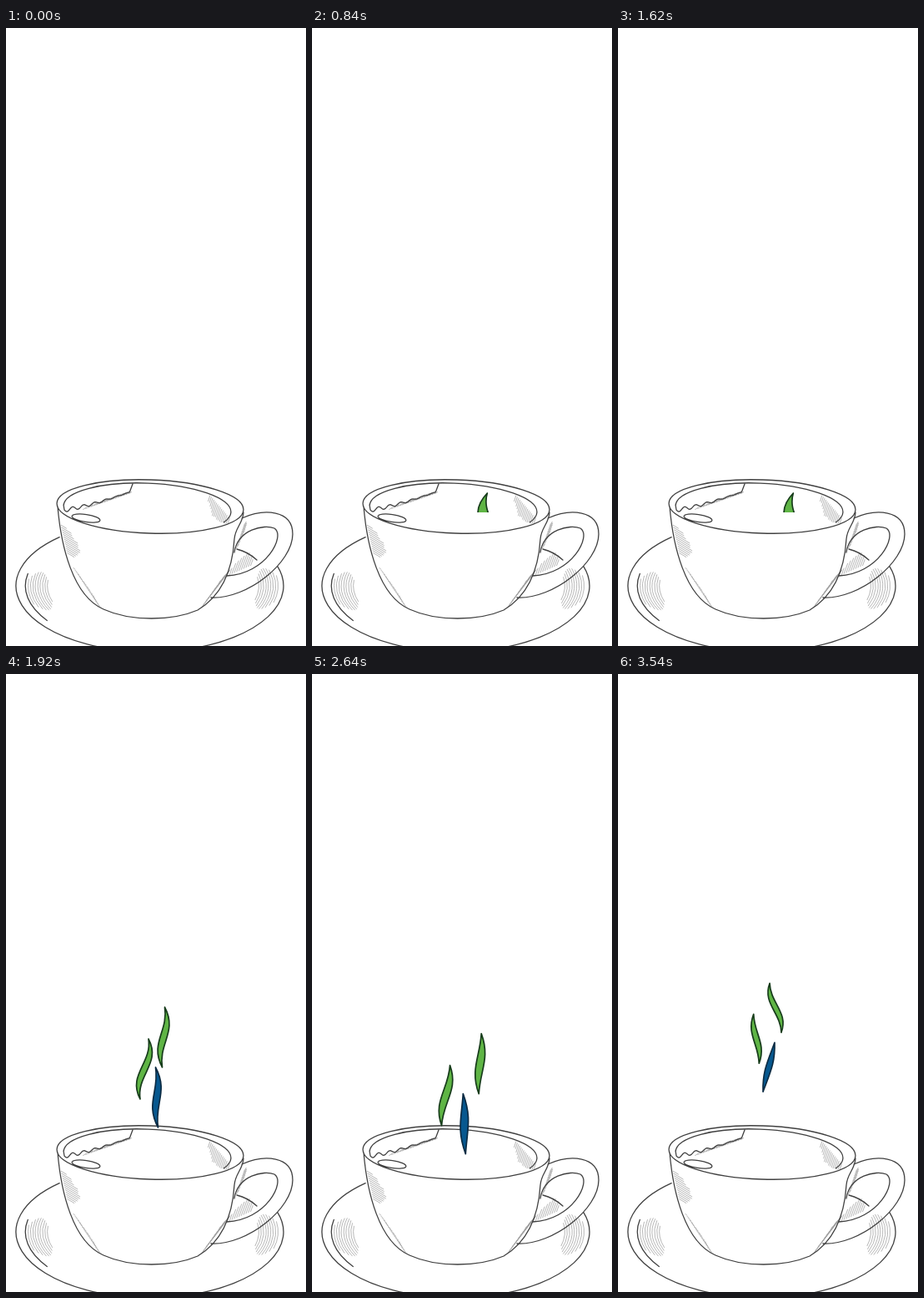
An HTML page with a canvas for the animation above (3.6 s loop, 360 px wide and 740 px high).

```html
<!DOCTYPE html>
<html lang="en">
<head>
<meta charset="utf-8">
<title>Steaming cup</title>
<style>
  html, body { margin: 0; width: 100%; height: 100%; overflow: hidden; background: #fff; }
  canvas { display: block; }
</style>
</head>
<body>
<canvas id="stage" width="360" height="740"></canvas>
<script>
const ctx = document.getElementById('stage').getContext('2d');
ctx.lineCap = ctx.lineJoin = 'round';

const STEP = 60, LOOP = 3600, CYCLE = 13, SURFACE = 580, PEAK = 6;
const GREEN = ['#5fb545', '#173c1b'], BLUE = ['#07588f', '#0b2b43'];

const outline = new Path2D(), shading = new Path2D();

function arc(path, x, y, rx, ry, tilt, from, to) {
  const part = new Path2D();
  part.ellipse(x, y, rx, ry, tilt, from, to);
  path.addPath(part);
}

// Arc parallel to the saucer's edge.
const ring = (path, scale, from, to) =>
  arc(path, 172.5, 668, 160.5 * scale, 79 * scale, 0, from, to);

function buildCup() {
  const { PI } = Math;
  arc(outline, 173, 573, 112, 32, .035, 0, 2 * PI);
  arc(outline, 169.5, 576, 100.5, 31, .04, PI, 2 * PI + .4);
  arc(outline, 96, 587, 17, 4.5, .15, 0, 2 * PI);

  // body, handle outside, handle inside, saucer seen through the handle
  outline.addPath(new Path2D(`
    M62 573 C66 620 80 680 117 696 C150 711 200 710 230 697
    C262 678 272 645 274 612 C275 598 284 594 285 580
    M283 587 C310 575 344 577 344 606 C344 640 290 684 246 682
    M274 628 C278 600 310 594 322 599 C336 608 312 654 265 656
    M277 624 Q290 627 301 637`));

  ring(outline, 1, -.3, PI + .83);
  ring(outline, .93, PI - .6, PI + .2);
  for (let i = 0; i < 9; i++) {
    const spread = .15 + .2 * Math.sin(PI * (i + 1) / 10);
    ring(shading, .91 - i * .018, PI - .1 - spread, PI - .1 + spread);
    ring(shading, .96 - i * .018, .05 - spread, .05 + spread);
  }

  // wavy liquid edge
  outline.moveTo(69, 571);
  for (let k = 0; k <= 1; k += .02) {
    outline.lineTo(70 + 80 * k, 577 - 22 * k ** 1.3 + 2.6 * Math.sin(k * 38) * (1 - k));
  }
  outline.lineTo(152, 546);
}

let seed = 7;
const random = () => (seed = seed * 16807 % 2147483647) / 2147483647;

// Strokes of offset (dx, dy), begun along a line and shorter at its ends.
function hatch(x1, y1, x2, y2, count, dx, dy) {
  for (let i = 0; i < count; i++) {
    const k = (i + .5) / count, x = x1 + (x2 - x1) * k, y = y1 + (y2 - y1) * k;
    const size = (.35 + .65 * Math.sin(Math.PI * k)) * (.8 + .3 * random());
    shading.moveTo(x, y);
    shading.lineTo(x + dx * size, y + dy * size);
  }
}

function buildShading() {
  hatch(66, 594, 74, 630, 13, 18, 11);
  hatch(80, 645, 112, 693, 18, 5, 5);
  hatch(234, 695, 267, 652, 17, 8, -13);
  hatch(244, 559, 269, 588, 16, -5, 15);
  hatch(276, 624, 286, 594, 11, 6, -9);
  hatch(267, 655, 295, 643, 10, 7, -19);
  hatch(91, 577, 149, 557, 18, 10, -6);
}

// lag: distance below the first wisp; drift: sideways swing while rising;
// lean: tip minus tail x, before and after the peak.
const wisps = [
  { paint: GREEN, x: 189, lag: 0, drift: 28, lean: [3, -17] },
  { paint: GREEN, x: 166, lag: 38, drift: -12, lean: [10, -8] },
  { paint: BLUE, x: 181, lag: 72, drift: 4, lean: [-3, 17] }
];

function drawWisp({ paint, x, lag, drift, lean }, step) {
  const youth = Math.max(0, (PEAK - step) / 5);
  const fade = Math.max(0, (step - PEAK) / 5);
  const life = 1 - fade / 1.1;
  if (life <= 0) return;

  const top = 399 + 158 * youth - 64 * Math.sqrt(fade) + lag - Math.min(lag, 27 * fade ** 2);
  const bottom = top + 72 * life, reach = 29 * life;
  const middle = x + drift * Math.sin(youth * Math.PI * .75);
  const tilt = (fade ? lean[1] * life : lean[0]) / 2;
  const tip = middle + tilt, tail = middle - tilt;
  const sway = fade ? -5 * life : 10 - 28 * youth;
  const half = 2 + 3.5 * life + 4 * youth;

  ctx.beginPath();
  ctx.moveTo(tip, top);
  ctx.bezierCurveTo(tip + sway + half, top + reach, tail - sway + half, bottom - reach, tail, bottom);
  ctx.bezierCurveTo(tail - sway - half, bottom - reach, tip + sway - half, top + reach, tip, top);
  [ctx.fillStyle, ctx.strokeStyle] = paint;
  ctx.lineWidth = 1.7;
  ctx.fill();
  ctx.stroke();
}

function strokePath(path, color, width) {
  ctx.strokeStyle = color;
  ctx.lineWidth = width;
  ctx.stroke(path);
}

function draw(now) {
  const step = Math.floor(now % LOOP / STEP) % CYCLE;
  ctx.fillStyle = '#fff';
  ctx.fillRect(0, 0, 360, 740);
  strokePath(shading, '#999', .7);
  strokePath(outline, '#404040', 1.3);
  ctx.save();
  ctx.beginPath();
  ctx.rect(0, 0, 360, SURFACE);
  ctx.clip();
  wisps.forEach(wisp => drawWisp(wisp, step));
  ctx.restore();
}

buildCup();
buildShading();
const start = performance.now();
(function tick() {
  draw(performance.now() - start);
  requestAnimationFrame(tick);
})();
</script>
</body>
</html>
```
